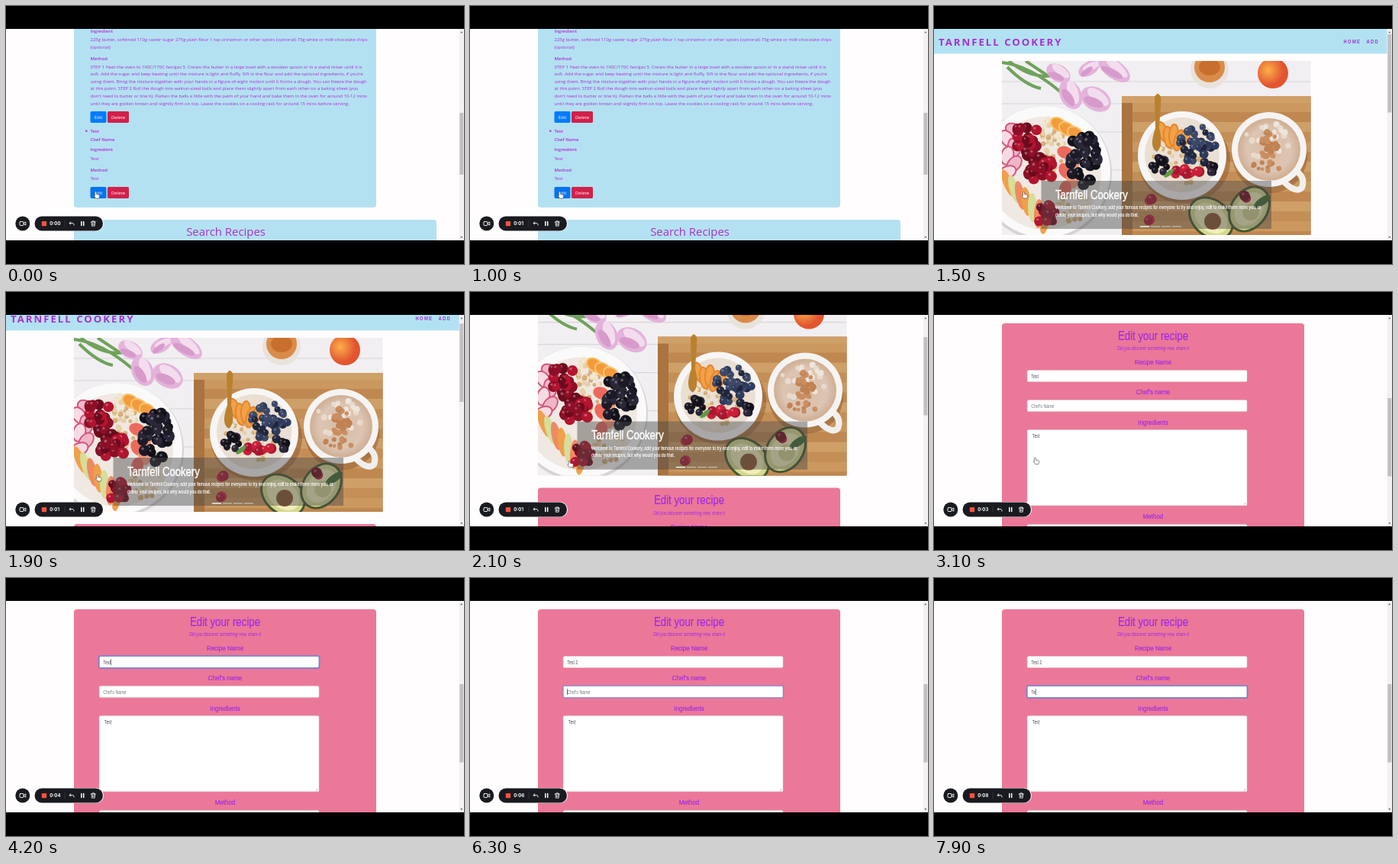
Recreate the animation shown at these times as an HTML page. Size 600 by 338 pixels, loop 8000 ms.

```html
<!DOCTYPE html>
<html lang="en">
<head>
<meta charset="utf-8">
<title>Recipe editing</title>
<style>
  html, body { margin: 0; height: 100%; overflow: hidden; background: #000; }
  svg { display: block; width: 100vw; height: 100vh; }
  text { white-space: pre; }
  .sans { font-family: "Open Sans", "Noto Sans", sans-serif; }
  .narrow { font-family: "Liberation Sans", Arial, sans-serif; }
  .timer { font: 700 6px Inter, sans-serif; fill: #fff; }
  .icon { fill: none; stroke: #fff; stroke-width: .9; stroke-linecap: round; stroke-linejoin: round; }
</style>
</head>
<body>
<svg id="stage" viewBox="0 0 600 338">
  <defs>
    <clipPath id="viewClip"><rect y="30" width="600" height="277"/></clipPath>
    <clipPath id="photoClip"><rect x="89" y="72" width="404.5" height="228"/></clipPath>
    <radialGradient id="latte">
      <stop offset="0" stop-color="#d9bda4"/><stop offset=".7" stop-color="#dcc5b3"/><stop offset="1" stop-color="#cfae93"/>
    </radialGradient>
    <radialGradient id="peach" cx=".35" cy=".4">
      <stop offset="0" stop-color="#fbb04a"/><stop offset="1" stop-color="#e2552f"/>
    </radialGradient>
  </defs>
  <rect width="600" height="338"/>
  <g clip-path="url(#viewClip)">
    <rect y="30" width="600" height="277" fill="#fffdfe"/>

    <g id="listPage">
      <rect x="89" y="20" width="396" height="244" rx="4" fill="#b4e1f2"/>
      <rect x="89" y="280" width="475" height="50" rx="4" fill="#b4e1f2"/>
      <circle cx="105.3" cy="163.7" r="1.2" fill="#a92ed0"/>
    </g>

    <g id="formPage">
      <rect y="30" width="594" height="32.5" fill="#b2e2f2"/>
      <g id="photo" clip-path="url(#photoClip)">
        <rect x="89" y="72" width="405" height="228" fill="#f1eff1"/>
        <path d="M89 99H494M89 128H250M215 165H250M225 215H250" stroke="#d9d6da" stroke-width="1.2"/>
        <path d="M89 74Q125 78 165 112M98 72Q130 98 160 90M120 72L150 92M96 80Q120 104 140 108" fill="none" stroke="#6fa25c" stroke-width="4"/>
        <g id="tulips"></g>
        <circle cx="361" cy="83" r="25" fill="#e9e2dc"/>
        <circle cx="361" cy="80" r="20" fill="#d98c4a"/>
        <ellipse cx="361" cy="80" rx="14" ry="11" fill="#c96f2e"/>
        <circle cx="444" cy="88" r="20" fill="url(#peach)"/>
        <g id="board"></g>
        <circle cx="145" cy="219" r="88" fill="#d8d3d2"/>
        <circle cx="145" cy="217" r="86" fill="#fbfafa"/>
        <circle cx="145" cy="219" r="74" fill="#f0e8e2"/>
        <g id="plate"></g>
        <ellipse cx="328" cy="203" rx="60" ry="56" fill="#8e5a30" opacity=".5"/>
        <circle cx="325" cy="196" r="58" fill="#f8f6f5"/>
        <circle cx="325" cy="195" r="49" fill="#e9dfd3"/>
        <g id="bowl"></g>
        <path d="M289 120Q293 110 297.500 120L295 160Q301 184 292 191Q281 186 290 160Z" fill="#b9812f"/>
        <circle cx="440" cy="196" r="49" fill="#8e5a30" opacity=".5"/>
        <path d="M468 212Q488 222 482 238Q474 246 458 230" fill="none" stroke="#f1efee" stroke-width="8"/>
        <circle cx="439" cy="188" r="49" fill="#f6f4f3"/>
        <circle cx="439" cy="188" r="41" fill="url(#latte)"/>
        <g id="spice"></g>
        <g id="avocados"></g>
        <g id="loose"></g>
        <rect x="140.500" y="229" width="301.500" height="63" fill="#484848" opacity=".45"/>
        <g id="bars" fill="#fff"></g>
      </g>
      <rect x="89" y="316" width="396" height="420" rx="4" fill="#eb7898"/>
      <g id="fields"></g>
    </g>

    <rect x="593.5" y="30" width="6.500" height="277" fill="#f3f2f3"/>
    <path d="M595.3 35.300l1.500-2 1.500 2zM595.300 302l1.500 2 1.500-2z" fill="#555"/>
    <rect id="thumb" x="594.3" width="5" fill="#c1c1c1"/>

    <g id="recorder">
      <circle cx="21.8" cy="285" r="10" fill="#fff"/>
      <circle cx="21.8" cy="285" r="9.5" fill="#1a1b20"/>
      <rect x="37" y="275" width="91" height="20" rx="10" fill="#fff"/>
      <rect x="37.500" y="275.500" width="89.500" height="19" rx="9.500" fill="#1a1b20"/>
      <g class="icon">
        <rect x="18" y="282.500" width="5" height="5" rx="1"/><path d="M23.200 284.400l2.600-1.500v4.200l-2.600-1.500"/>
        <path d="M84.800 282.800l-1.800 1.700 1.800 1.700M83.200 284.500h4q2 .2 2 2.500"/>
        <path d="M98.800 282.500v5M101.700 282.500v5" stroke-width="1.500"/>
        <path d="M111.300 283h6M113 283v-1.200h2.600v1.200M112 283l.4 5.200h3.800l.4-5.200M113.600 284.800v1.800M115 284.800v1.800" stroke-width=".8"/>
      </g>
      <rect x="46.800" y="282" width="6.400" height="6.200" rx=".8" fill="#f0553c"/>
      <path d="M77 281v8" stroke="#3c3d44" stroke-width=".7"/>
      <text id="timer" class="timer" x="57.300" y="287.200"></text>
    </g>
    <path id="hand" d="M-1 0Q0-1 1 0V2.600L4.500 3.400Q5.400 3.800 5.200 5L4.500 8H0L-2.400 4.600Q-2 4-1 4.500Z" fill="#fff" stroke="#333" stroke-width=".55"/>
  </g>
</svg>
<script>
const LOOP = 8000, STEP = 100, NARROW = .82;
const BRAND = "Tarnfell Cookery";
const ORCHID = "#a92ed0", VIOLET = "#a02be8", INK = "#495057", HINT = "#757b82";
const $ = id => document.getElementById(id);

function el(parent, tag, attrs) {
  const node = document.createElementNS("http://www.w3.org/2000/svg", tag);
  for (const key in attrs) node.setAttribute(key, attrs[key]);
  return parent.appendChild(node);
}

// x is the anchor, cy the middle of the capitals
function label(parent, face, str, x, cy, size, fill, extra = {}) {
  const squeeze = face === "narrow" ? ` scale(${NARROW} 1)` : "";
  const node = el(parent, "text", {
    class: face, "font-size": size, fill,
    transform: `translate(${x} ${cy + size * .36})${squeeze}`, ...extra
  });
  node.textContent = str;
  return node;
}

let seed = 7;
const rnd = () => (seed = seed * 16807 % 2147483647) / 2147483647;

function scatter(parent, n, cx, cy, rx, ry, r, colors, shine = .3) {
  for (let i = 0; i < n; i++) {
    const a = rnd() * Math.PI * 2, d = Math.sqrt(rnd());
    const x = cx + Math.cos(a) * d * rx, y = cy + Math.sin(a) * d * ry;
    const size = r * (.8 + rnd() * .4);
    el(parent, "circle", { cx: x, cy: y, r: size, fill: colors[i % colors.length] });
    el(parent, "circle", { cx: x - size * .3, cy: y - size * .35, r: size * .25, fill: "#fff", opacity: shine });
  }
}

function slice(parent, cx, cy, rx, ry, turn, fill, stroke = "none") {
  el(parent, "ellipse", { cx, cy, rx, ry, fill, stroke, "stroke-width": 2, transform: `rotate(${turn} ${cx} ${cy})` });
}

const CHERRY = ["#8d0f26", "#b3142f", "#6d0a1e"];
const BLACK = ["#1c1a26", "#2b2738", "#121119"];
const RED = ["#c9203a", "#a81730"];
const OAT = ["#e6cfa6", "#d2ae78", "#f2e4cc"];

function drawPhoto() {
  const tulips = $("tulips"), plate = $("plate"), bowl = $("bowl"), loose = $("loose");
  [[163, 88, 17, 11, 30], [179, 116, 20, 14, 65], [212, 122, 21, 15, 30], [203, 82, 15, 9, -30], [236, 83, 24, 12, 35]]
    .forEach(([x, y, rx, ry, turn]) => {
      slice(tulips, x, y, rx, ry, turn, "#e3b3da");
      slice(tulips, x + 3, y - 3, rx * .8, ry * .5, turn + 8, "#f3dcee");
      slice(tulips, x - 3, y + 4, rx * .65, ry * .4, turn - 8, "#d79bcb");
    });

  const wood = ["#cb985f", "#c48f56", "#cf9f68", "#bf8850"];
  el($("board"), "rect", { x: 246, y: 118, width: 250, height: 184, fill: "#a8743f" });
  for (let i = 0; i < 14; i++)
    el($("board"), "rect", { x: 260, y: 126 + i * 13, width: 240, height: 13.3, fill: wood[i * 3 % 4] });
  el($("board"), "rect", { x: 246, y: 118, width: 250, height: 9, fill: "#d0a069" });

  scatter(plate, 60, 155, 180, 16, 38, 3, OAT);
  for (let i = 0; i < 6; i++)
    slice(plate, 105 - i % 2 * 9, 163 + i * 11, 12, 8, 30 + i * 25, ["#efb6c8", "#f7dbe2"][i % 2], "#d3587f");
  for (let i = 0; i < 3; i++) slice(plate, 163 + i * 11, 155 + i * 6, 11, 8, 35, "#f39b3c", "#f7c46f");
  for (let i = 0; i < 7; i++) slice(plate, 97 + i * 8, 232 + i * 8, 6, 19, -22 + i * 5, ["#f0a04b", "#d7dd9a", "#ee8a63"][i % 3]);
  for (let i = 0; i < 5; i++) slice(plate, 172 + i % 2 * 9, 192 + i * 12, 11, 8, 20 + i * 20, ["#ec6a5c", "#f29a7f"][i % 2]);
  scatter(plate, 24, 121, 174, 16, 24, 6.500, CHERRY);
  scatter(plate, 22, 140, 214, 18, 16, 6.500, CHERRY);
  scatter(plate, 14, 148, 274, 14, 16, 6, CHERRY);
  scatter(plate, 38, 196, 200, 19, 36, 6.500, BLACK);
  scatter(plate, 30, 185, 264, 26, 20, 3, OAT);

  scatter(bowl, 60, 318, 205, 34, 32, 3, OAT);
  for (let i = 0; i < 5; i++) slice(bowl, 300 + i * 7, 165 + i % 2 * 5 + i * 2, 6, 14, -20 + i * 12, "#f1a148", "#e5852d");
  scatter(bowl, 34, 345, 181, 24, 26, 5, ["#2f3b5c", "#3c4868", "#20263d"]);
  scatter(bowl, 10, 295, 210, 13, 12, 5.500, BLACK);
  scatter(bowl, 12, 330, 219, 19, 9, 6, RED);
  scatter(bowl, 5, 364, 213, 6, 6, 6, BLACK);
  slice(bowl, 308, 219, 8, 3, -40, "#5e9a4a");

  scatter($("spice"), 26, 436, 178, 30, 26, 3.500, ["#e8dacd", "#efe5dc"], 0);
  scatter($("spice"), 30, 439, 182, 11, 20, 3.500, ["#c08253", "#c98f63"], 0);
  scatter($("spice"), 12, 436, 210, 18, 8, 3, ["#c08253", "#c98f63"], 0);

  [[363, 278, 40], [413, 266, -55]].forEach(([x, y, turn]) => {
    slice(loose, x, y, 33, 25, turn, "#45552c");
    slice(loose, x, y, 30, 22, turn, "#d5d98f");
    slice(loose, x, y, 24, 17, turn, "#f0eeb8");
    el(loose, "circle", { cx: x + 2, cy: y + 4, r: 11, fill: x < 400 ? "#8a5630" : "#d3d190" });
  });
  scatter(loose, 2, 284, 255, 4, 3, 6, RED);
  scatter(loose, 2, 281, 279, 4, 3, 6, RED);
  scatter(loose, 3, 407, 250, 5, 4, 6, CHERRY);
  slice(loose, 430, 256, 13, 5, -35, "#3f6a31");

  for (let i = 0; i < 4; i++)
    el($("bars"), "rect", { x: 269.8 + i * 14, y: 288.300, width: 12.200, height: 1.300, opacity: i ? .5 : 1 });
}

function drawList() {
  const page = $("listPage");
  const bold = { "font-weight": 600 };
  const body = (lines, cy) => lines.forEach((line, i) => label(page, "sans", line, 110.500, cy + i * 9.55, 5.95, ORCHID));
  const head = (str, cy) => label(page, "sans", str, 110.500, cy, 5.95, ORCHID, bold);
  const button = (x, y, width, str, fill) => {
    el(page, "rect", { x, y, width, height: 15, rx: 1.700, fill });
    label(page, "sans", str, x + width / 2, y + 7.500, 6, "#fff", { "text-anchor": "middle" });
  };

  head("Ingredient", 32.500);
  body(["225g butter, softened 110g caster sugar 275g plain flour 1 tsp cinnamon or other spices (optional) 75g white or milk chocolate chips",
    "(optional)"], 44.300);
  head("Method", 68.500);
  body(["STEP 1 Heat the oven to 190C/170C fan/gas 5. Cream the butter in a large bowl with a wooden spoon or in a stand mixer until it is",
    "soft. Add the sugar and keep beating until the mixture is light and fluffy. Sift in the flour and add the optional ingredients, if you're",
    "using them. Bring the mixture together with your hands in a figure-of-eight motion until it forms a dough. You can freeze the dough",
    "at this point. STEP 2 Roll the dough into walnut-sized balls and place them slightly apart from each other on a baking sheet (you",
    "don't need to butter or line it). Flatten the balls a little with the palm of your hand and bake them in the oven for around 10-12 mins",
    "until they are golden brown and slightly firm on top. Leave the cookies on a cooling rack for around 15 mins before serving."], 79.700);
  head("Test", 163.700);
  head("Chef Name", 174.500);
  head("Ingredient", 188.300);
  body(["Test"], 200);
  head("Method", 214.700);
  body(["Test"], 226.300);
  [138, 237].forEach(y => {
    button(110.500, y, 21, "Edit", y > 200 ? "#0573ee" : "#007bff");
    button(133, y, 28, "Delete", "#d0214a");
  });
  label(page, "sans", "Search Recipes", 288, 295.500, 14.900, ORCHID, { "text-anchor": "middle" });
}

function makeField(y, height, hint = "") {
  const parent = $("fields");
  const box = { x: 122.200, y, width: 287.800, height, rx: 1.600 };
  const glow = el(parent, "rect", { ...box, fill: "none", stroke: "#007bff", "stroke-width": 2.800, opacity: 0 });
  const frame = el(parent, "rect", { ...box, fill: "#fff", stroke: "#ced4da", "stroke-width": .4 });
  const text = label(parent, "narrow", "", height > 20 ? 128.800 : 127.300, y + 7.600, 6.400, INK);
  const caret = el(parent, "rect", { y: y + 3.500, width: .6, height: 8, fill: "#111", opacity: 0 });
  return (value, focus, caretOn) => {
    text.textContent = value || hint;
    text.setAttribute("fill", value ? INK : HINT);
    glow.setAttribute("opacity", focus * .4);
    frame.setAttribute("stroke", focus ? "#5f86d8" : "#ced4da");
    frame.setAttribute("stroke-width", .4 + focus * .4);
    caret.setAttribute("opacity", caretOn ? 1 : 0);
    const typed = value ? text.getComputedTextLength() * NARROW : 0;
    caret.setAttribute("x", 127.300 + typed);
  };
}

function drawForm() {
  const page = $("formPage");
  const mid = { "text-anchor": "middle" };
  const thick = { stroke: VIOLET, "stroke-width": .2 };
  label(page, "sans", BRAND.toUpperCase(), 6, 46.800, 13.200, ORCHID, { "font-weight": 700, "letter-spacing": 2 });
  ["HOME", "ADD"].forEach((str, i) =>
    label(page, "narrow", str, 536.500 + i * 30, 46.500, 7, "#9a35cc", { "font-weight": 700, "letter-spacing": 1.700 }));
  label($("photo"), "narrow", BRAND, 159, 247, 16, "#fff", { stroke: "#fff", "stroke-width": .45 });
  [`Welcome to ${BRAND}, add your famous recipes for everyone to try and enjoy, edit to make them more you, or`,
    "delete your recipes, but why would you do that."
  ].forEach((line, i) =>
    label($("photo"), "narrow", line, 159, 264 + i * 9.300, 6.400, "#fff", { stroke: "#fff", "stroke-width": .15 }));

  label(page, "narrow", "Edit your recipe", 287, 332, 16.200, VIOLET, { ...mid, ...thick });
  label(page, "narrow", "Did you discover something new, share it", 287, 349, 6.300, VIOLET, { ...mid, "font-style": "italic" });
  [["Recipe Name", 367], ["Chef's name", 406], ["Ingredients", 445.300], ["Method", 569]]
    .forEach(([str, y]) => label(page, "narrow", str, 287, y, 9.700, VIOLET, { ...mid, ...thick }));
}

drawPhoto();
drawList();
drawForm();
const nameField = makeField(377.600, 15);
const chefField = makeField(416.600, 15, "Chef's Name");
makeField(455.600, 99.200)("Test", 0, false);
makeField(579.400, 99.200)("Test", 0, false);
el($("fields"), "path", { d: "M406 553.500l2.500-2.500M407.500 553.500l1-1", stroke: "#777", "stroke-width": .5 });

const LOADED = 1200, RECORDER_BACK = 1900;
const SCROLL = { from: 1755, to: 2905, distance: 275 };
const TICKS = [900, 2200, 2900, 3900, 4900, 5900, 6900, 7900];
const NAME_FOCUS = 3900, CHEF_FOCUS = 6230;
const NAME_KEYS = [[0, "Test"], [5000, "Test "], [5400, "Test 2"]];
const CHEF_KEYS = [[0, ""], [7500, "T"], [7700, "Te"]];

const ramp = (t, from, to) => Math.min(1, Math.max(0, (t - from) / (to - from)));
const ease = u => u * u * (3 - 2 * u);
const show = (id, on) => $(id).setAttribute("visibility", on ? "visible" : "hidden");

function setField(field, keys, t, from, to) {
  const [time, value] = keys.filter(k => k[0] <= t).pop();
  const active = t >= from && t < to;
  const blinkOn = (t - Math.max(time, from)) % 1060 < 530;
  field(value, active ? ramp(t, from, from + 150) : 0, active && blinkOn);
}

// From the Edit button down the page, then up to the first field
function moveHand(t) {
  const aside = ease(ramp(t, 1800, 2200)), up = ease(ramp(t, 3400, 3750));
  $("hand").setAttribute("transform", `translate(${117.5 + 15 * aside + 8 * up} ${244 - 26.5 * aside - 108 * up})`);
  show("hand", t < 3800);
}

function render(t) {
  const loaded = t >= LOADED;
  const scroll = SCROLL.distance * ease(ramp(t, SCROLL.from, SCROLL.to));
  show("listPage", !loaded);
  show("formPage", loaded);
  show("recorder", !loaded || t >= RECORDER_BACK);
  $("formPage").setAttribute("transform", `translate(0 ${-scroll})`);
  $("thumb").setAttribute("y", loaded ? 37 + scroll * .371 : 140);
  $("thumb").setAttribute("height", loaded ? 102.500 : 81);
  $("timer").textContent = "0:0" + TICKS.filter(tick => tick <= t).length;
  moveHand(t);
  setField(nameField, NAME_KEYS, t, NAME_FOCUS, CHEF_FOCUS);
  setField(chefField, CHEF_KEYS, t, CHEF_FOCUS, LOOP);
}

const start = performance.now();
function frame() {
  const t = Math.max(0, performance.now() - start) % LOOP;
  render(Math.floor(t / STEP) * STEP);
  requestAnimationFrame(frame);
}
frame();
</script>
</body>
</html>
```
